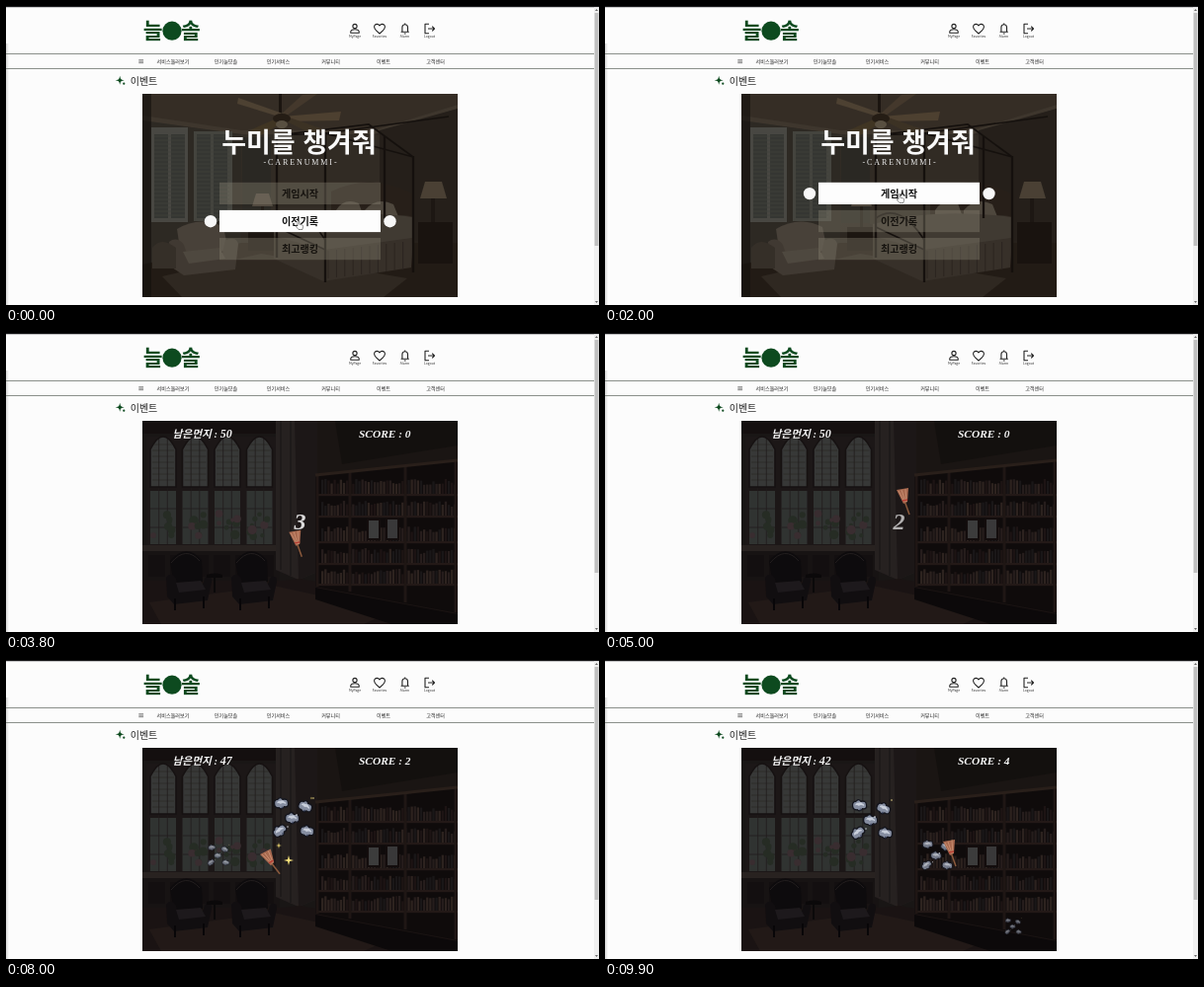
Write an HTML page that moves like this. It is 600 px wide and 303 px high and loops after 10000 ms.

```html
<!DOCTYPE html>
<html lang="ko">
<head>
<meta charset="utf-8">
<title>이벤트</title>
<style>
html, body { margin: 0; width: 100%; height: 100%; overflow: hidden; background: #fcfcfc; }
svg { display: block; width: 100%; height: 100%; }
text { font-family: "Noto Sans CJK KR", "Noto Sans CJK", sans-serif; text-anchor: middle; white-space: pre; }
.serif { font-family: "Liberation Serif", "Noto Sans CJK KR", serif; }
.hud { font-family: "Liberation Serif", "Noto Sans CJK KR", serif; font-weight: 700; font-style: italic; fill: #f4f4f4; text-anchor: start; }
</style>
</head>
<body>
<svg id="stage" viewBox="0 0 600 303" preserveAspectRatio="none"></svg>
<script>
const LOOP = 10000, STEP = 100;
const stage = document.getElementById('stage');

const rect = (x, y, w, h, fill, more = '') => `<rect x="${x}" y="${y}" width="${w}" height="${h}" fill="${fill}" ${more}/>`;
const line = (d, color, w = 1) => `<path d="${d}" fill="none" stroke="${color}" stroke-width="${w}"/>`;
const shape = (d, fill, more = '') => `<path d="${d}" fill="${fill}" ${more}/>`;
const circle = (x, y, r, fill) => `<circle cx="${x}" cy="${y}" r="${r}" fill="${fill}"/>`;
const text = (x, y, size, s, more = '') => `<text x="${x}" y="${y}" font-size="${size}" ${more}>${s}</text>`;
const group = (s, more = '') => `<g ${more}>${s}</g>`;
const star = (x, y, r, fill) => {
  const q = r * 0.2;
  return shape(`M${x} ${y - r}L${x + q} ${y - q}L${x + r} ${y}L${x + q} ${y + q}L${x} ${y + r}L${x - q} ${y + q}L${x - r} ${y}L${x - q} ${y - q}Z`, fill);
};
const range = (n, f) => Array.from({ length: n }, (_, i) => f(i)).join('');
let seed = 7;
const rand = () => (seed = seed * 16807 % 2147483647) / 2147483647;

function page() {
  const green = '#0d4a1f', ink = '#222';
  const nav = [[169, '서비스둘러보기'], [222.5, '인기늘모솔'], [275.5, '인기서비스'], [328.5, '커뮤니티'], [382, '이벤트'], [434.5, '고객센터']];
  const labels = [[353, 'MyPage'], [378, 'Favorites'], [403.5, 'Alarm'], [428.5, 'Logout']];
  const icons = '<circle cx="353" cy="20.5" r="2.1"/>' +
    '<path d="M348.8 27.3v-1.2c0-3.2 8.4-3.2 8.4 0v1.2z"/>' +
    '<path d="M378 28l-3.4-3.2c-5-4.8.6-8.7 3.4-5 2.8-3.7 8.4.2 3.4 5z"/>' +
    '<path d="M399.6 26.3h8.2M400.9 26v-4.2c0-4 5.6-4 5.6 0V26M403.7 18.7v-1.2M402.8 28h1.8"/>' +
    '<path d="M428 18.3h-4v9.4h4M427 23h6.4M431.2 20.7l2.3 2.3-2.3 2.3"/>';
  return rect(0, 0, 600, 303, '#fcfcfc') +
    rect(0, 0, 600, 1.2, '#1d1d1f') +
    rect(0, 38, 3, 265, 'url(#edge)') +
    rect(595, 1.2, 5, 302, '#f0f0f0') + rect(595.6, 7, 3.8, 236, '#bfbfbf') +
    shape('M596 5l1.5-2 1.5 2z', '#666') + shape('M596 299l1.5 2 1.5-2z', '#666') +
    text(148.6, 33.3, 21.5, '늘', `font-weight="900" fill="${green}"`) +
    circle(168, 25.2, 9.6, green) +
    text(187, 33.3, 21.5, '솔', `font-weight="900" fill="${green}"`) +
    group(icons, `fill="none" stroke="${ink}" stroke-width="1.1" stroke-linejoin="round"`) +
    labels.map(([x, s]) => text(x, 32.3, 3.4, s, 'fill="#333"')).join('') +
    rect(0, 48, 595, 0.9, '#7d847d') + rect(0, 63, 595, 0.9, '#7d847d') +
    line('M134.3 54.7h4.8M134.3 56.2h4.8M134.3 57.7h4.8', '#333', 0.6) +
    nav.map(([x, s]) => text(x, 58, 5.1, s, 'fill="#222" font-weight="500"')).join('') +
    star(115.2, 75.3, 4.5, green) + circle(115.2, 75.3, 1.7, green) + circle(119.3, 78.7, 1.1, green) +
    text(139.5, 80, 10, '이벤트', `fill="${ink}"`);
}

function bedroom() {
  const post = '#15110e';
  return rect(138, 89, 319, 206, 'url(#wall)') +
    shape('M138 89H457V100L372 126H238L138 111Z', '#463d32') +
    shape('M138 111L238 126H372L457 100V104L372 130H238L138 116Z', '#534a3e') +
    shape('M138 116L238 130V246L138 262Z', '#39362f') +
    // shuttered windows
    rect(147, 123, 37, 96, '#62645e') + rect(190, 127, 39, 91, '#5d5f58') +
    range(2, c => rect(150 + c * 43, 130, 14, 85, '#464a45') + rect(167 + c * 43, 130, 14, 85, '#464a45')) +
    range(21, i => line(`M150 ${132 + i * 4}H181M193 ${132 + i * 4}H226`, '#555952', 0.8)) +
    rect(239, 133, 29, 87, '#35352f') + rect(268, 131, 110, 90, '#403a31') +
    shape('M378 126L457 104V244L378 232Z', '#2d2822') +
    shape('M138 262L238 240H457V295H138Z', '#292119') +
    shape('M158 274L258 251L406 276L382 295H178Z', '#3c352c') +
    // lamps
    shape('M253 190h13l4 13h-21z', '#71695b') + rect(258, 203, 3, 22, '#2b241d') +
    shape('M424 178h17l5 17h-27z', '#655a49') + rect(430, 195, 4, 25, '#211b16') +
    rect(245, 224, 28, 24, '#201913') + rect(417, 219, 35, 42, '#1b1511') +
    // bed
    shape('M329 188Q370 168 411 190V226H329Z', '#302820') +
    shape('M334 207q8-13 23-7l5 14h-28zM363 207q12-14 29-6l6 15h-35z', '#6b6457') +
    shape('M271 221Q330 204 413 214L410 263L321 276L271 250Z', '#575046') +
    shape('M271 233L322 247L411 235L410 265L321 279L271 256Z', '#484138') +
    range(10, i => line(`M${326 + i * 8.4} ${248 - i}v28`, '#373029', 1)) +
    line('M274 130V255M323 128V280M412 152V270M383 132V215', post, 2.3) +
    line('M274 131L367 120L412 153L323 129L274 131M323 129L448 112', post, 1.7) +
    line('M274 215Q298 198 323 237M274 224L323 247', post, 1.6) +
    // armchair
    shape('M173 226Q196 212 220 224L225 248L177 253Z', '#625b50') +
    shape('M165 239q8-6 15 3l4 12 35-4 3-13q11-4 13 4l-3 26-52 6-15-10z', '#574f45') +
    shape('M179 249l37-4 6 11-37 5z', '#6c6559') +
    shape('M148 245q9-12 24 0v21h-24z', '#463f37') +
    // ceiling fan
    rect(276, 89, 3, 20, '#1e1812') +
    shape('M276 112L234 99L235 93L280 109Z', '#6a5b46') +
    shape('M278 110L300 90L315 89L284 111Z', '#5c4e3c') +
    shape('M280 112L339 107L337 116L282 117Z', '#6a5942') +
    shape('M276 113L247 126L258 131L280 118Z', '#57482f') +
    shape('M280 115L310 130L321 125L284 112Z', '#514431') +
    `<ellipse cx="279" cy="114" rx="9" ry="5" fill="#2d241a"/><ellipse cx="279" cy="120" rx="6" ry="4" fill="#7b705d"/>` +
    rect(138, 89, 9, 206, '#12100d', 'opacity=".6"') +
    rect(138, 89, 319, 206, '#15110d', 'opacity=".34"');
}

function library() {
  const pane = x => {
    const arch = `M${x} 118Q${x + 13} 92 ${x + 26} 118V156H${x}Z`;
    return shape(arch, '#474846') + rect(x, 160, 26, 54, '#3e413e') +
      range(7, i => line(`M${x + 2} ${113 + i * 6}h22`, '#302c2a', 0.6)) +
      line(`M${x + 8.7} 106V214M${x + 17.3} 106V214M${x} 178h26M${x} 197h26`, '#292423', 0.8) +
      line(arch, '#1b1514', 1.6) +
      range(9, () => circle(x + 3 + rand() * 20, 183 + rand() * 24, 2 + rand() * 3, rand() < 0.25 ? '#493a3c' : '#30392d'));
  };
  const books = y => range(44, i => {
    const h = 9 + rand() * 6, x = 319 + i * 3.12;
    return rect(x, y - h, 2.3, h, ['#302522', '#251917', '#3a2c26', '#211d1d'][rand() * 4 | 0]);
  });
  const chair = x => group(
    shape('M4 12Q20-7 36 11L37 33L8 36Z', '#100d0e') +
    shape('M0 29q5-7 10 1l2 10 24-2 4-10q7-1 6 5l-4 19-34 4-7-8z', '#151113') +
    shape('M10 34l25-2 5 9-27 3z', '#252022') +
    line('M9 50v12M38 48v12', '#090708', 2) +
    line('M5 14Q20-4 34 12', '#2b2524', 1), `transform="translate(${x} 219)"`);
  return rect(138, 89, 319, 206, '#201b19') +
    shape('M138 89H290V102H138Z', '#191311') +
    rect(142, 105, 132, 112, '#231d1b') + range(4, i => pane(146 + i * 32.5)) +
    rect(138, 215, 139, 6, '#332b28') + rect(138, 221, 139, 30, '#1d1716') +
    range(6, i => rect(144 + i * 22, 225, 17, 22, '#171212')) +
    shape('M273 89H315V242L296 250L273 240Z', '#312a28') + shape('M292 89H315V242L296 250Z', '#241d1c') +
    line('M278 89V240M288 89V246', '#1d1816', 1) +
    shape('M315 89H457V131L315 145Z', '#211a16') +
    shape('M333 89L457 89V114L340 133Z', '#181410') +
    shape('M138 251H277L298 249L457 278V295H138Z', '#211816') +
    shape('M145 273L270 256L390 282L362 295H157Z', '#2b201c') +
    shape('M313 144L457 129V284L313 257Z', '#120d0c') +
    [163, 185, 211, 233, 254].map(y => books(y) + rect(315, y, 142, 2.2, '#2c201b')).join('') +
    line('M315 144V257M348 141V262M404 135V273M455 130V283', '#271c18', 3) +
    line('M313 144L457 129', '#34271f', 3) +
    rect(365, 188, 14, 22, '#17100f') + rect(367, 190, 10, 18, '#4e4d4c') +
    rect(384, 187, 14, 23, '#17100f') + rect(386, 189, 10, 19, '#494848') +
    shape('M313 258L457 285V295H390L313 270Z', '#0f0b0a') +
    chair(162) + chair(228) +
    shape('M203 245q8-3 16 0v3h-16z', '#0d0a0a') + line('M211 247v16', '#0d0a0a', 2) +
    rect(138, 89, 319, 206, '#08080a', 'opacity=".24"');
}

function button(y, label, on, border, serif) {
  const cls = serif ? 'class="serif"' : '';
  const size = serif ? 10.6 : 10.1;
  const edge = on && border ? `stroke="${border}" stroke-width="1.6"` : '';
  return rect(216, y, 163, 22.2, on ? '#fdfdfd' : '#8d8779', on ? edge : 'opacity=".36"') +
    text(297.5, y + 14.9, size, label, `${cls} font-weight="700" fill="${on ? '#111' : '#16130f'}"`) +
    (on ? circle(207, y + 11.3, 6.2, '#f7f7f7') + circle(388.5, y + 11.3, 6.2, '#f7f7f7') : '');
}

const hand = (x, y) => group(
  shape('M0 0q1-1 1.8 0v3.2l3 .8q1 .4.8 1.5l-.7 3H1L-2 5q.2-1.2 2 0z', '#fff', 'stroke="#222" stroke-width=".5"'),
  `transform="translate(${x} ${y})"`);

function menu(t) {
  const on = t < 1200 ? 1 : 0;
  return text(296.5, 147.5, 27, '누미를 챙겨줘', 'font-weight="900" fill="#fafafa"') +
    text(298.5, 160.8, 8, '-CARENUMMI-', 'class="serif" fill="#eee" letter-spacing="1.9"') +
    ['게임시작', '이전기록', '최고랭킹'].map((s, i) => button(178.8 + i * 28.1, s, i === on)).join('');
}

function levels(t) {
  const on = t < 2800 ? 1 : 2;
  const edges = ['#3d8a4a', '#d0a030', '#b4323c'];
  return ['EAZY', 'NORMAL', 'HARD'].map((s, i) => button(153 + i * 28.1, s, i === on, edges[i], true)).join('');
}

// [time, x, y]
const path = [
  [0, 295, 218], [900, 295, 215], [1300, 297, 191], [2300, 297, 191], [2900, 291, 218], [3599, 291, 218],
  [3600, 292, 218], [4300, 300, 200], [5000, 303, 170], [5700, 308, 178], [6700, 303, 190], [6800, 292, 202],
  [7000, 292, 202], [7400, 328, 155], [7500, 330, 152], [7800, 292, 164], [8000, 268, 205], [8400, 217, 200],
  [8500, 215, 198], [8900, 380, 150], [9400, 390, 185], [9700, 356, 196], [9900, 350, 195], [10000, 346, 196]
];
function pointer(t) {
  const i = Math.max(1, path.findIndex(p => p[0] > t));
  const [a, x, y] = path[i - 1], [b, u, v] = path[i];
  const k = (t - a) / (b - a);
  return [x + (u - x) * k, y + (v - y) * k];
}

const broom = ([x, y], tilt) => group(
  line('M0 0L5 14', '#8b5a3c', 1.5) +
  shape('M-8-11L4-13L3 1L-1 3Z', '#a8694f') +
  line('M-6-10L0 1M-3-11L1 1M1-12L2 1', '#d9a184', 0.6) +
  line('M-2 0L3-1', '#b63b32', 1.4), `transform="translate(${x} ${y}) rotate(${tilt})"`);

// x, y, birth, end, swept
const dusts = [
  [330, 150, 7050, 7500, 1], [291, 160, 7350, 7850, 1], [215, 198, 7700, 8500, 1], [380, 150, 8150, 8900, 1],
  [410, 205, 8600, 9700, 0], [270, 162, 8900, 1e5, 0], [336, 198, 9350, 1e5, 0], [413, 270, 9750, 1e5, 0]
];
const puffs = [[-13, -14, 10], [11, -11, 35], [-2, 1, 15], [-14, 14, -25], [13, 14, 20]];
const puff = ([x, y, a]) => group(
  shape('M-6 2q-2-5 2-6 2-4 5-1 5-2 6 2 2 5-3 5-2 4-5 2-4 1-5-2z', '#858da0', 'stroke="#12131b" stroke-width="1.3"') +
  shape('M-4 0q0-3 3-3 2-2 4 0 2 0 2 2-4-1-5 1-2-1-4 0z', '#c9cfdb') +
  circle(2, 3, 0.9, '#454d66'), `transform="translate(${x} ${y}) rotate(${a})"`);

function dust([x, y, birth, end, swept], t) {
  const since = t - end;
  if (t < birth || since >= (swept ? 250 : 0)) return '';
  const s = swept && since >= 0 ? 1 : Math.min(1, 0.28 + (t - birth) / 1150);
  let out = puffs.map(puff).join('') + circle(20, -20, 0.8, '#e8d68a') + circle(3, -3, 0.8, '#fff') + circle(-6, 9, 0.7, '#dfe5f0');
  if (swept && since >= 0) {
    const k = since / 150;
    out += star(-15 * k, 28 * k, 3, '#f3dc73') + star(-5 * k, 43 * k, 5, '#f8e47c') + star(18 * k, -20 * k, 1.5, '#f3dc73');
  }
  return group(out, `transform="translate(${x} ${y}) scale(${s})" opacity="${Math.min(1, 0.25 + s * 0.8)}"`);
}

function game(t) {
  const left = 50 - dusts.filter(d => t >= d[2]).length;
  const score = dusts.filter(d => d[4] && t >= d[3]).length;
  let out = text(168.5, 106, 10.7, `남은먼지 : <tspan font-size="12">${left}</tspan>`, 'class="hud"') +
    text(357, 106, 11.4, `SCORE : ${score}`, 'class="hud"');
  if (t >= 3700 && t < 6700) {
    const n = Math.floor((t - 3700) / 1000), k = (t - 3700) % 1000 / 1000;
    out += text(297.5, 198.5, 24, 3 - n, `class="serif" font-weight="700" font-style="italic" fill="#f0f0f0" opacity="${1 - k}"`);
  }
  const hit = dusts.some(d => d[4] && t >= d[3] && t < d[3] + 200);
  return out + dusts.map(d => dust(d, t)).join('') + broom(pointer(t), hit ? -18 : 0);
}

stage.innerHTML = `<defs>
  <linearGradient id="edge"><stop stop-color="#d6d6d6"/><stop offset="1" stop-color="#fcfcfc"/></linearGradient>
  <linearGradient id="wall" x2="1" y2="1"><stop stop-color="#4a453b"/><stop offset="1" stop-color="#29231d"/></linearGradient>
  <clipPath id="frame"><rect x="138" y="89" width="319" height="206"/></clipPath>
</defs>` + page() +
  group(group(bedroom(), 'id="bed"') + group(library(), 'id="lib"') + '<g id="live"></g>', 'clip-path="url(#frame)"');
const [bed, lib, live] = ['bed', 'lib', 'live'].map(id => document.getElementById(id));

function draw(t) {
  const playing = t >= 3600;
  bed.style.display = playing ? 'none' : '';
  lib.style.display = playing ? '' : 'none';
  live.innerHTML = playing ? game(t) : (t < 2300 ? menu(t) : levels(t)) + hand(...pointer(t));
}

const start = performance.now();
let last = -1;
function tick() {
  const t = Math.floor((performance.now() - start) % LOOP / STEP) * STEP;
  if (t !== last) draw(last = t);
  requestAnimationFrame(tick);
}
tick();
</script>
</body>
</html>
```
